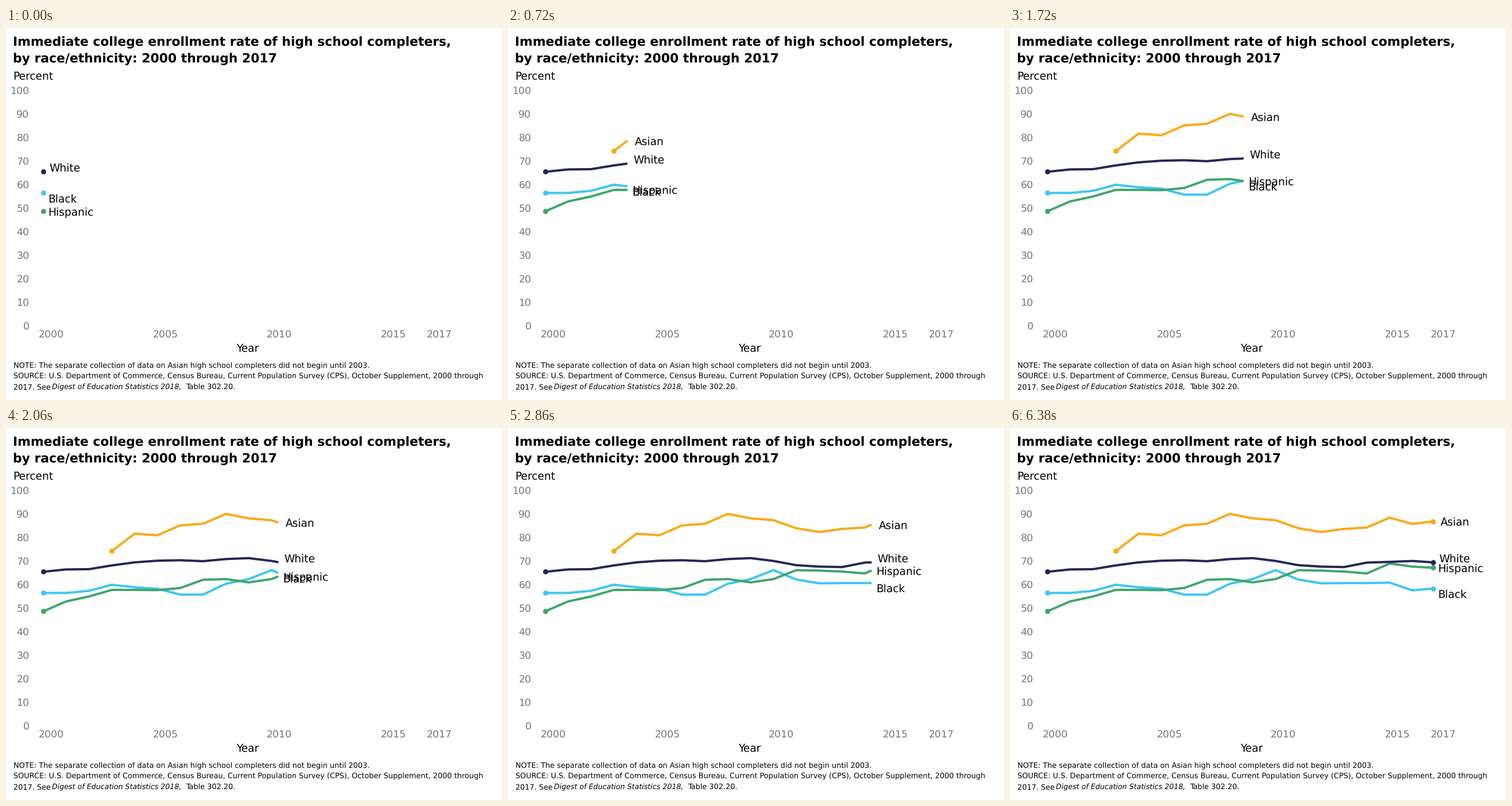
Write a matplotlib script that moves like this. It is 864 by 648 pixels and loops after 6.4 s.

```python
import matplotlib.pyplot as plt
import numpy as np
from matplotlib.animation import FuncAnimation

W, H = 864, 648
FRAMES, INTERVAL = 320, 20
X0, YEAR_PX = 65, 39.75          # pixel position of 2000, pixels per year
Y0, PCT_PX = 519, 4.1            # pixel position of 0 percent, pixels per point
STEP, LAST = 0.1, 16.9           # years drawn per frame, where the lines stop
END = round(LAST / STEP) + 1     # the closing dots appear here

plt.rcParams["font.family"] = "DejaVu Sans"
plt.rcParams["text.hinting"] = "none"

# name: (colour, first year, values, label dx, label dy)
SERIES = {
    "Asian": ("#fba919", 3, [
        74.3, 81.7, 81.0, 85.2, 85.9, 90.1, 88.2, 87.4,
        84.0, 82.4, 83.7, 84.3, 88.5, 85.8, 86.9], 12.8, 0.5),
    "Black": ("#3ec6f4", 0, [
        56.5, 56.5, 57.4, 60.0, 58.9, 58.3, 55.8, 55.8, 60.4,
        62.4, 66.2, 62.2, 60.6, 60.7, 60.7, 60.9, 57.6, 58.4], 8, 9.2),
    "Hispanic": ("#3fa56b", 0, [
        48.7, 52.9, 55.0, 57.8, 57.8, 57.7, 58.6, 62.1, 62.4,
        61.0, 62.4, 66.2, 66.0, 65.6, 64.8, 69.0, 67.7, 67.2], 8.2, 0.7),
    "White": ("#232855", 0, [
        65.5, 66.5, 66.6, 68.2, 69.5, 70.2, 70.4, 70.0, 70.9,
        71.3, 70.1, 68.3, 67.7, 67.5, 69.4, 69.7, 70.1, 69.5], 10.4, -7.2),
}

fig = plt.figure(figsize=(W / 72, H / 72), dpi=72, facecolor="white")
ax = fig.add_axes([0, 0, 1, 1])
ax.set_xlim(0, W)
ax.set_ylim(H, 0)
ax.axis("off")


def put(x, y, text, size, **kw):
    return ax.text(x, y, text, fontsize=size, va="baseline", **kw)


def to_px(year, value):
    return X0 + YEAR_PX * np.asarray(year), Y0 - PCT_PX * np.asarray(value)


# Titles and axis text
put(12, 31.4, "Immediate college enrollment rate of high school completers,",
    21.84, weight="bold")
put(12, 60.6, "by race/ethnicity: 2000 through 2017", 21.84, weight="bold")
put(12, 90.5, "Percent", 18.6)
put(421, 565, "Year", 18.6, ha="center")

GREY = "#777777"
for pct in range(0, 101, 10):
    put(40.5, 525.2 - 4.1 * pct, str(pct), 17.4, ha="right", color=GREY)
for year in (2000, 2005, 2010, 2015, 2017):
    put(78.6 + 39.76 * (year - 2000), 538.3, str(year), 17.4,
        ha="center", color=GREY)

# Footnotes
NOTE = 12.86
put(13, 592, "NOTE: The separate collection of data on Asian high school "
    "completers did not begin until 2003.", NOTE)
put(13, 610.3, "SOURCE: U.S. Department of Commerce, Census Bureau, Current "
    "Population Survey (CPS), October Supplement, 2000 through", NOTE)
put(13, 629.4, "2017. See", NOTE)
put(80, 629.4, "Digest of Education Statistics 2018,", 12.6, style="italic")
put(313, 629.4, "Table 302.20.", NOTE)


class Trace:
    """One growing line with its dots and travelling label."""

    def __init__(self, name, color, first, values, dx, dy, z):
        self.first, self.values = first, np.array(values)
        self.years = np.append(np.arange(first, 17), LAST)
        self.dx, self.dy = dx, dy + 6.8
        self.line, = ax.plot([], [], color=color, lw=4, zorder=z,
                             solid_capstyle="butt", solid_joinstyle="round")
        self.dots, = ax.plot([], [], "o", color=color, ms=9, mew=0,
                             zorder=z + 0.5)
        self.label = put(0, 0, name, 18.6, zorder=20)

    def update(self, now, done):
        shown = now >= self.first - 1e-9
        parts = (self.line, self.dots, self.label)
        for part in parts:
            part.set_visible(shown)
        if shown:
            past = self.years < now - 1e-9
            years = np.append(self.years[past], now)
            tip = np.interp(now, self.years, self.values)
            xs, ys = to_px(years, np.append(self.values[past], tip))
            self.line.set_data(xs, ys)
            ends = [0, -1] if done else [0]
            self.dots.set_data(xs[ends], ys[ends])
            self.label.set_position((xs[-1] + self.dx, ys[-1] + self.dy))
        return parts


traces = [Trace(name, *spec, z=3 + i)
          for i, (name, spec) in enumerate(SERIES.items())]


def draw(i):
    now = min(i * STEP, LAST)
    return [part for t in traces for part in t.update(now, i >= END)]


anim = FuncAnimation(fig, draw, frames=FRAMES, interval=INTERVAL,
                     init_func=lambda: draw(0), repeat=True)
plt.show()
```
